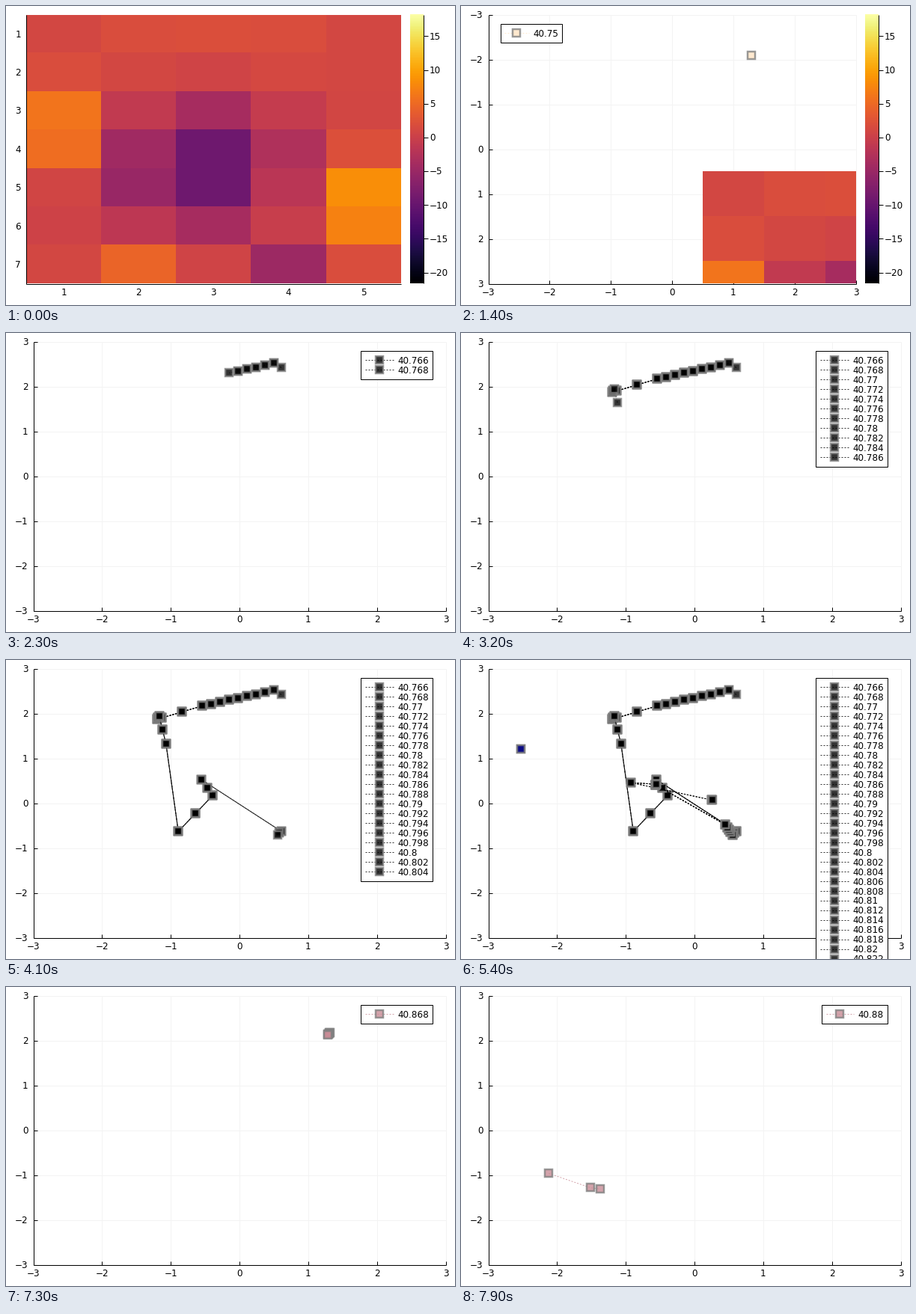
Animation of 600x400 px, one loop 8 s. Source, as a matplotlib script:

```python
import numpy as np
import matplotlib.pyplot as plt
from matplotlib.animation import FuncAnimation
from matplotlib.patches import Rectangle

W, H, DPI = 600, 400, 100
PT = 72 / DPI              # points per pixel
FONT = 12                  # text height in pixels
FRAMES, STEP = 80, 100
TOP, BOTTOM = 12, 372

BISQUE = (1.0, 0.894, 0.769)
ROSE = (0.79, 0.55, 0.59)
BLACK = (0.0, 0.0, 0.0)
NAVY = (0.0, 0.0, 0.502)
GRID = "#f3f3f3"
ALPHA = 0.8

VMIN, VMAX = -21.6, 18.2
WINDOW = 6                 # positions in one trail


def make_field(rows=7, cols=5):
    """A gentle arch across the columns plus a few round bumps."""
    r, c = np.mgrid[1:rows + 1, 1:cols + 1]
    field = 2.2 * np.sin(np.pi * c / (cols + 1))
    for row, col, height, spread in [(4.5, 2.85, -12.5, 1.25),
                                     (3.5, 1, 7, 0.75),
                                     (5.4, 5, 9, 0.75),
                                     (7, 2, 3.6, 0.5),
                                     (7, 4, -6, 0.5)]:
        d2 = (r - row) ** 2 + (1.4 * (c - col)) ** 2
        field += height * np.exp(-d2 / (2 * spread ** 2))
    return field


def walk(*legs):
    """Even steps through key points given as (steps, x, y)."""
    steps, xs, ys = zip(*legs)
    at = np.cumsum(steps)
    n = np.arange(at[-1] + 1)
    return list(zip(np.interp(n, at, xs), np.interp(n, at, ys)))


FIELD = make_field()
OPENING = walk((0, 1.29, -2.10), (2, 1.27, -2.05))
REPLAY = walk(
    (0, 0.61, 2.42), (1, 0.50, 2.52), (8, -0.54, 2.17), (2, -1.13, 1.90),
    (1, -1.20, 1.88), (2, -1.17, 1.94), (2, -1.07, 1.33), (1, -0.89, -0.63),
    (2, -0.39, 0.17), (2, -0.55, 0.52), (1, 0.61, -0.63), (2, 0.55, -0.70),
    (4, 0.45, -0.48), (1, -0.57, 0.41), (2, -0.56, 0.42), (1, -0.93, 0.46),
    (1, 0.25, 0.07), (2, 0.26, 0.08))
JUMP = [(-2.53, 1.20)]
DRIFT = walk((0, 1.26, 1.98), (3, 1.27, 2.04), (3, 1.33, 2.20),
             (10, 1.26, 2.10))
RETURN = walk((0, -2.12, -0.965), (1, -1.515, -1.283), (1, -1.37, -1.313))

fig = plt.figure(figsize=(W / DPI, H / DPI), dpi=DPI, facecolor="white")
ax = fig.add_axes([0, 0, 1, 1])


class Frame:
    """Plot box that maps data values to stage pixels."""

    def __init__(self, left, right, xlim, ylim):
        self.left, self.right = left, right
        self.xlim, self.ylim = xlim, ylim

    def x(self, v):
        a, b = self.xlim
        return self.left + (v - a) / (b - a) * (self.right - self.left)

    def y(self, v):
        a, b = self.ylim
        return BOTTOM + (v - a) / (b - a) * (TOP - BOTTOM)


CELLS = Frame(27.5, 528, (0.5, 5.5), (7.5, 0.5))
NARROW = Frame(37, 528, (-3, 3), (3, -3))
WIDE = Frame(37, 588, (-3, 3), (-3, 3))


def segment(xs, ys, color="black", z=2):
    ax.plot(xs, ys, color=color, lw=PT, zorder=z, solid_capstyle="butt")


def text(x, y, s, ha="left", z=3):
    ax.text(x, y + 0.365 * FONT, s, ha=ha, va="baseline", zorder=z,
            fontsize=FONT * PT, family="DejaVu Sans", clip_on=True)


def number(v):
    return f"{v}".replace("-", "\u2212")


def draw_axes(fr, xticks, yticks, ticks=True):
    for v in xticks:
        x = fr.x(v)
        if ticks:
            segment([x, x], [TOP, BOTTOM], GRID, 0)
            segment([x, x], [BOTTOM, BOTTOM - 5], z=0.5)
        text(x, 383.5, number(v), "center")
    for v in yticks:
        y = fr.y(v)
        if ticks:
            segment([fr.left, fr.right], [y, y], GRID, 0)
            segment([fr.left, fr.left + 5], [y, y], z=0.5)
        text(fr.left - 7, y, number(v), "right")
    segment([fr.left, fr.left], [TOP, BOTTOM])
    segment([fr.left, fr.right], [BOTTOM, BOTTOM])


def draw_heatmap(fr):
    rows, cols = FIELD.shape
    extent = (fr.x(0.5), fr.x(cols + 0.5), fr.y(rows + 0.5), fr.y(0.5))
    image = ax.imshow(FIELD, cmap="inferno", vmin=VMIN, vmax=VMAX, zorder=1,
                      extent=extent, aspect="auto", interpolation="nearest")
    image.set_clip_path(Rectangle((fr.left, TOP), fr.right - fr.left,
                                  BOTTOM - TOP, transform=ax.transData))


def draw_colorbar():
    ramp = np.linspace(1, 0, 256)[:, None]
    ax.imshow(ramp, cmap="inferno", extent=(540.5, 558.5, 371.5, TOP),
              aspect="auto", zorder=1)
    segment([558.5, 558.5], [TOP, 371.5])
    for v in range(-20, 16, 5):
        y = TOP + (VMAX - v) / (VMAX - VMIN) * (371.5 - TOP)
        segment([558.5, 564], [y, y])
        text(566.5, y, number(v))


def draw_series(xs, ys, color, z, marks=None):
    ax.plot(xs, ys, color=(*color, ALPHA), lw=PT, ls=(0, (2, 2)), marker="s",
            ms=10 * PT, mew=2.5 * PT, mfc=(*color, ALPHA),
            mec=(0.5, 0.5, 0.5, ALPHA), zorder=z, markevery=marks)


def draw_legend(fr, entries, left_side=False):
    s = (fr.right - fr.left) / 551
    row = 12.97
    chars = max(len(label) for label, _, _ in entries)
    width = 53.5 * s + (0.636 * (chars - 1) + 0.318) * FONT
    x = fr.left + 18 * s if left_side else fr.right - 18 * s - width
    y = TOP + 12
    ax.add_patch(Rectangle((x, y), width, row * (len(entries) + 1), fc="white",
                           ec="black", lw=PT, zorder=5))
    for i, (label, _, color) in enumerate(entries):
        cy = y + row * (i + 1)
        if cy > H + 10:
            break
        draw_series([x + 6 * s, x + 24.5 * s, x + 43.5 * s], [cy] * 3,
                    color, 6, [1])
        text(x + 49 * s, cy + 0.3, label, z=6)


def stamp(f):
    return f"{40.75 + 0.002 * (f - 14):.3f}".rstrip("0")


def series_at(f):
    """List of (label, points, color) that are visible at step f."""
    if f < 18:
        f = min(f, 16)
        return [(stamp(f), OPENING[:f - 13], BISQUE)]
    if f < 22:
        return [(stamp(f), REPLAY[:f - 16], ROSE)]
    if f < 60:
        trails = [(stamp(k), REPLAY[k - 22:k - 22 + WINDOW], BLACK)
                  for k in range(22, min(f, 52) + 1)]
        jumps = [(stamp(k), JUMP, NAVY) for k in range(53, min(f, 54) + 1)]
        return trails + jumps
    if f < 77:
        n = f - 59
        return [(stamp(f), DRIFT[max(0, n - WINDOW):n], ROSE)]
    return [(stamp(f), RETURN[:f - 76], ROSE)]


def update(f):
    ax.clear()
    ax.axis("off")
    if f < 14:
        draw_heatmap(CELLS)
        draw_axes(CELLS, range(1, 6), range(1, 8), ticks=False)
        draw_colorbar()
    else:
        early = f < 18
        fr = NARROW if early else WIDE
        draw_axes(fr, range(-3, 4), range(-3, 4))
        if early:
            draw_heatmap(fr)
            draw_colorbar()
        entries = series_at(f)
        for _, points, color in entries:
            xs, ys = zip(*points)
            draw_series([fr.x(v) for v in xs], [fr.y(v) for v in ys], color, 4)
        draw_legend(fr, entries, left_side=early)
    # half a pixel of offset puts hairlines on whole pixels
    ax.set_xlim(0.5, W + 0.5)
    ax.set_ylim(H + 0.5, 0.5)
    return []


anim = FuncAnimation(fig, update, frames=FRAMES, interval=STEP,
                     init_func=lambda: update(0), repeat=True, repeat_delay=0)
plt.show()
```
